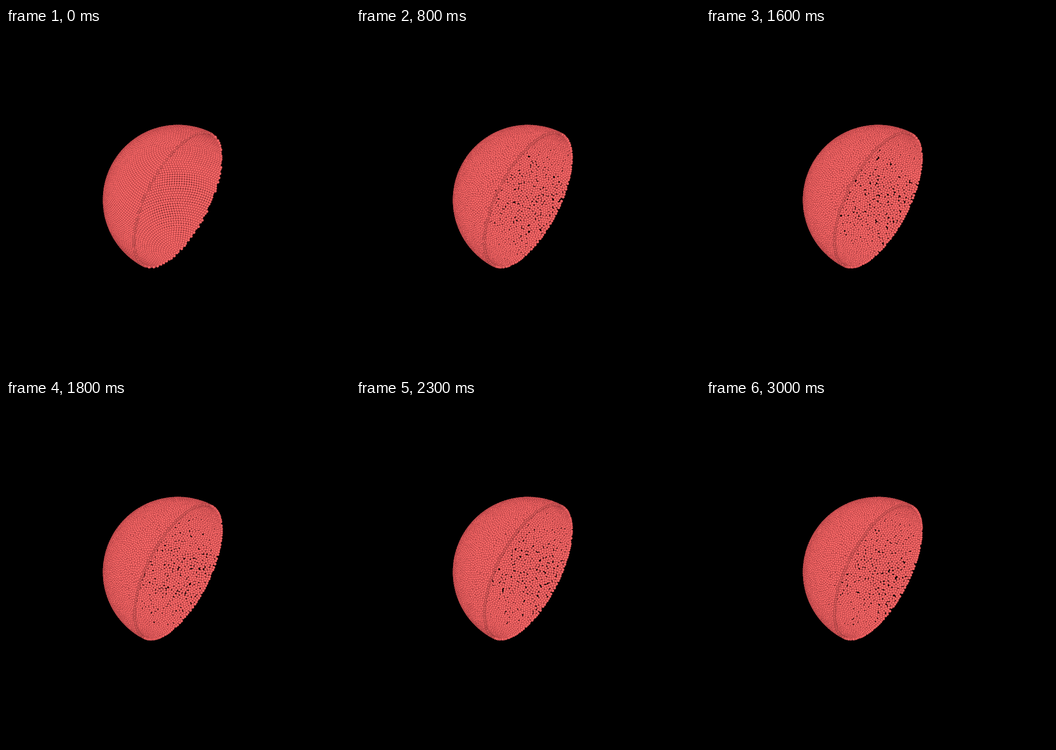
Animation of 748x748 px, one loop 3100 ms. Source, as an HTML page with a canvas:

```html
<!DOCTYPE html>
<html lang="en">
<head>
<meta charset="utf-8">
<title>Bead hemisphere</title>
<style>
  html, body { margin: 0; width: 100%; height: 100%; overflow: hidden; background: #000; }
  canvas { display: block; }
</style>
</head>
<body>
<canvas id="stage" width="748" height="748"></canvas>
<script>
const SIZE = 748, CENTER = 374;
const STEP_MS = 100, STEPS = 31;
const RADIUS = 160.6, SPACING = 5.4, MIN_GAP = 5.38, BEAD = 3.4;
const KICK = 1.1, RELAX_PASSES = 12;

const ctx = document.getElementById('stage').getContext('2d');

// Screen axes (right, down, towards viewer) of the model's x, y and z.
const unit = v => { const l = Math.hypot(...v); return v.map(c => c / l); };
const cross = (a, b) => [
  a[1] * b[2] - a[2] * b[1],
  a[2] * b[0] - a[0] * b[2],
  a[0] * b[1] - a[1] * b[0]
];
const axisX = unit([0.81, 0.415, 0.42]);
const axisZ = unit([0, -axisX[2], axisX[1]]);
const axisY = cross(axisX, axisZ);

let seed = 20117;
function random() {
  seed = (seed + 0x6D2B79F5) | 0;
  let t = Math.imul(seed ^ (seed >>> 15), 1 | seed);
  t = (t + Math.imul(t ^ (t >>> 7), 61 | t)) ^ t;
  return ((t ^ (t >>> 14)) >>> 0) / 4294967296;
}
const jitter = () => (random() + random() + random() - 1.5) * 2 * KICK;

// Evenly spaced rings around z, keeping the half with x <= 0.
function ringLattice() {
  const points = [];
  const rings = Math.round(Math.PI * RADIUS / SPACING);
  for (let m = 0; m < rings; m++) {
    const theta = Math.PI * (m + 0.5) / rings;
    const r = RADIUS * Math.sin(theta);
    const count = Math.round(2 * Math.PI * r / SPACING);
    for (let k = 0; k < count; k++) {
      const phi = 2 * Math.PI * k / count;
      const x = r * Math.cos(phi);
      if (x < 0.01) points.push(x, r * Math.sin(phi), RADIUS * Math.cos(theta));
    }
  }
  return Float32Array.from(points);
}

// Puts every bead back on the half shell.
function constrain(p) {
  for (let i = 0; i < p.length; i += 3) {
    if (p[i] > 0) p[i] = 0;
    const s = RADIUS / Math.hypot(p[i], p[i + 1], p[i + 2]);
    p[i] *= s; p[i + 1] *= s; p[i + 2] *= s;
  }
}

const GRID = 64;
const heads = new Int32Array(GRID ** 3);
const cell = v => Math.floor(v / SPACING) + GRID / 2;

// Pushes overlapping beads apart, using a linked-cell grid.
function separate(p) {
  const count = p.length / 3, next = new Int32Array(count);
  heads.fill(-1);
  for (let i = 0; i < count; i++) {
    const a = i * 3;
    const cx = cell(p[a]), cy = cell(p[a + 1]), cz = cell(p[a + 2]);
    for (let x = cx - 1; x <= cx + 1; x++)
      for (let y = cy - 1; y <= cy + 1; y++)
        for (let z = cz - 1; z <= cz + 1; z++)
          for (let j = heads[(x * GRID + y) * GRID + z]; j >= 0; j = next[j]) {
            const b = j * 3;
            const dx = p[a] - p[b], dy = p[a + 1] - p[b + 1], dz = p[a + 2] - p[b + 2];
            const d2 = dx * dx + dy * dy + dz * dz;
            if (d2 >= MIN_GAP * MIN_GAP || d2 < 1e-6) continue;
            const d = Math.sqrt(d2), push = 0.5 * (MIN_GAP - d) / d;
            p[a] += dx * push; p[a + 1] += dy * push; p[a + 2] += dz * push;
            p[b] -= dx * push; p[b + 1] -= dy * push; p[b + 2] -= dz * push;
          }
    const home = (cx * GRID + cy) * GRID + cz;
    next[i] = heads[home];
    heads[home] = i;
  }
}

function advance(previous) {
  const p = previous.map(v => v + jitter());
  constrain(p);
  for (let pass = 0; pass < RELAX_PASSES; pass++) {
    separate(p);
    constrain(p);
  }
  return p;
}

const states = [ringLattice()];
function stateAt(step) {
  while (states.length <= step) states.push(advance(states[states.length - 1]));
  return states[step];
}

function makeBead(shadow) {
  const sprite = document.createElement('canvas');
  sprite.width = sprite.height = 32;
  const g = sprite.getContext('2d');
  const shade = g.createRadialGradient(15, 14.5, 0, 16, 16, 15.5);
  shade.addColorStop(0, '#ff7471');
  shade.addColorStop(0.5, '#f86565');
  shade.addColorStop(0.78, '#d95455');
  shade.addColorStop(1, '#8c3438');
  g.arc(16, 16, 15.5, 0, 2 * Math.PI);
  g.fillStyle = shade;
  g.fill();
  g.fillStyle = `rgba(0, 0, 0, ${shadow})`;
  g.fill();
  return sprite;
}
const plainBead = makeBead(0), rimBead = makeBead(0.12);

function draw(p) {
  const project = (i, c) => p[i] * axisX[c] + p[i + 1] * axisY[c] + p[i + 2] * axisZ[c];
  const beads = [];
  for (let i = 0; i < p.length; i += 3) {
    const depth = project(i, 2);
    const sprite = depth > 0 && p[i] > -BEAD ? rimBead : plainBead;
    beads.push({ x: project(i, 0), y: project(i, 1), depth, sprite });
  }
  beads.sort((a, b) => a.depth - b.depth);
  ctx.fillStyle = '#000';
  ctx.fillRect(0, 0, SIZE, SIZE);
  for (const { x, y, sprite } of beads)
    ctx.drawImage(sprite, CENTER + x - BEAD, CENTER + y - BEAD, 2 * BEAD, 2 * BEAD);
}

let shown = -1;
function tick() {
  const step = Math.floor(performance.now() / STEP_MS) % STEPS;
  if (step !== shown) {
    draw(stateAt(step));
    shown = step;
  }
  requestAnimationFrame(tick);
}
tick();
</script>
</body>
</html>
```
